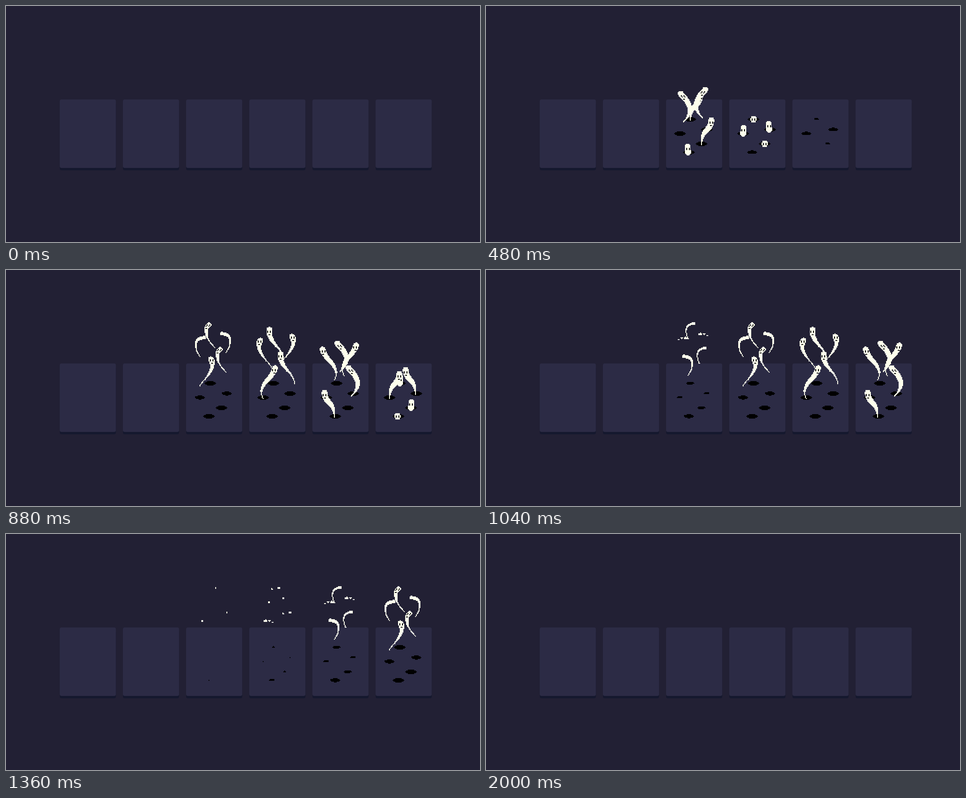
Animation, 1058 px wide and 529 px high, one loop 2160 ms. Source, as an HTML page with a canvas:

```html
<!DOCTYPE html>
<html lang="en">
<head>
<meta charset="utf-8">
<title>Ghost cards</title>
<style>
  html, body { margin: 0; width: 100%; height: 100%; overflow: hidden; background: #222034; }
  canvas { display: block; }
</style>
</head>
<body>
<canvas id="stage" width="1058" height="529"></canvas>
<script>
const ctx = document.getElementById('stage').getContext('2d');
const LOOP = 2160, STEP = 80, CELL = 2, PITCH = 141;
const WHITE = '#fdfeec', BLACK = '#000';

// Back to front; positions are those on the third card.
const ghosts = [
  { x: 455, y: 253, delay: 1, side: 1 },
  { x: 492, y: 276, delay: 0, side: -1 },
  { x: 432, y: 285, delay: 0, side: 1 },
  { x: 480, y: 308, delay: 1, side: 1 },
  { x: 452, y: 327, delay: 2, side: -1 }
];

// Every ghost slides along this trail, which starts in its hole and ends in a curl.
const trail = [
  [1, 2], [3, -14], [9, -26], [19, -38], [23, -54], [17, -71], [3, -88],
  [-5, -101], [-8, -112], [-7, -124], [0, -131], [12, -133], [17, -126]
];

const snap = v => Math.round(v / CELL) * CELL;

function box(x, y, w, h, color) {
  ctx.fillStyle = color;
  ctx.fillRect(x, y, w, h);
}

// Ellipse made of whole cells
function blob(x, y, rx, ry, color) {
  for (let row = snap(y - ry); row < snap(y + ry); row += CELL) {
    const d = (row + CELL / 2 - y) / ry;
    const half = Math.max(1, rx * Math.sqrt(Math.max(0, 1 - d * d)));
    const left = snap(x - half);
    box(left, row, snap(x + half) - left, CELL, color);
  }
}

// Point on the trail (Catmull-Rom); u counts trail points.
function trailPoint(u) {
  const last = trail.length - 1;
  const i = Math.max(0, Math.min(last - 1, Math.floor(u))), f = Math.max(0, u - i);
  const at = n => trail[Math.max(0, Math.min(last, n))];
  return [0, 1].map(k => {
    const [a, b, c, d] = [at(i - 1)[k], at(i)[k], at(i + 1)[k], at(i + 2)[k]];
    return b + f / 2 * (c - a + f * (2 * a - 5 * b + 4 * c - d + f * (3 * (b - c) + d - a)));
  });
}

// The head slows down towards the curl; the tail leaves the hole at age 5 and catches up.
const headAt = age => age > 10 ? 10.8 : Math.max(.2, 11 - 7.1 * .7 ** (age - 5));
const tailAt = age => age < 5 ? 3 * (age - 5) : 6.8 * ((age - 5) / 7) ** .65;

function drawBody(age) {
  const head = headAt(age), tail = tailAt(age), bottom = Math.max(0, tail);
  const size = Math.min(13, 13 - 2.5 * (age - 9));
  const taper = Math.max(1, 2.2 - .3 * Math.max(0, age - 5));
  for (let n = 0; n <= 60; n++) {
    const u = head + (bottom - head) * n / 60;
    const t = (head - u) / (head - tail);
    const r = Math.max(1, size / 2 * (1 - t ** taper));
    blob(...trailPoint(u), r, r, WHITE);
  }
}

function drawFace(age) {
  const head = headAt(age);
  const [x, y] = trailPoint(head - .35);
  const [fromX, fromY] = trailPoint(head - .5), [toX, toY] = trailPoint(head);
  const lean = Math.round((toX - fromX) / Math.hypot(toX - fromX, toY - fromY));
  for (const eye of [x - 3, x + 3]) {
    box(snap(eye + lean) - 1, snap(y) - 3, CELL, 3, BLACK);
    box(snap(eye - lean) - 1, snap(y), CELL, 2, BLACK);
  }
  if (age > 4) box(snap(x - 3 * lean) - 2, snap(y) + 5, 4, CELL, BLACK);
}

// What is left of the curl breaks into ever fewer, smaller bits.
function drawCrumbs(age) {
  let r = .75 * (18 - age);
  for (let u = 11.2; u > 9.5; u -= .75 * (age - 12), r *= .7) blob(...trailPoint(u), r, r * .8, WHITE);
}

function drawHole({ x, y, delay }, step) {
  const age = step - delay;
  if (age < 1 || age > 15) return;
  const open = Math.min(1, age / 2.5, (15.3 - age) / 5);
  ctx.save();
  ctx.translate(x, y);
  blob(open, open, Math.max(1, 13 * open), Math.max(1, 5 * open), BLACK);
  ctx.restore();
}

function drawGhost({ x, y, delay, side }, step) {
  const age = step - delay;
  if (age < 3 || age > 16) return;
  ctx.save();
  ctx.translate(x, y);
  ctx.scale(side, 1);
  if (age < 13) drawBody(age);
  else drawCrumbs(age);
  if (age < 11) drawFace(age);
  ctx.restore();
}

function card(x, y, h, color) {
  ctx.fillStyle = color;
  ctx.beginPath();
  ctx.roundRect(x, y, 125.3, h, 4);
  ctx.fill();
}

function draw(step) {
  box(0, 0, 1058, 529, '#222034');
  for (let i = 0; i < 6; i++) {
    card(120 + i * PITCH, 215, 153.3, '#15182e');
    card(120 + i * PITCH, 209.5, 153.5, '#2c2b45');
  }
  for (let i = 0; i < 4; i++) {
    ctx.save();
    ctx.translate(i * PITCH, 0);
    ghosts.forEach(g => drawHole(g, step - 2 * i));
    ghosts.forEach(g => drawGhost(g, step - 2 * i));
    ctx.restore();
  }
}

let shown = -1;
const start = performance.now();
function tick() {
  const step = Math.floor((performance.now() - start) % LOOP / STEP);
  if (step !== shown) draw(shown = step);
  requestAnimationFrame(tick);
}
tick();
</script>
</body>
</html>
```
